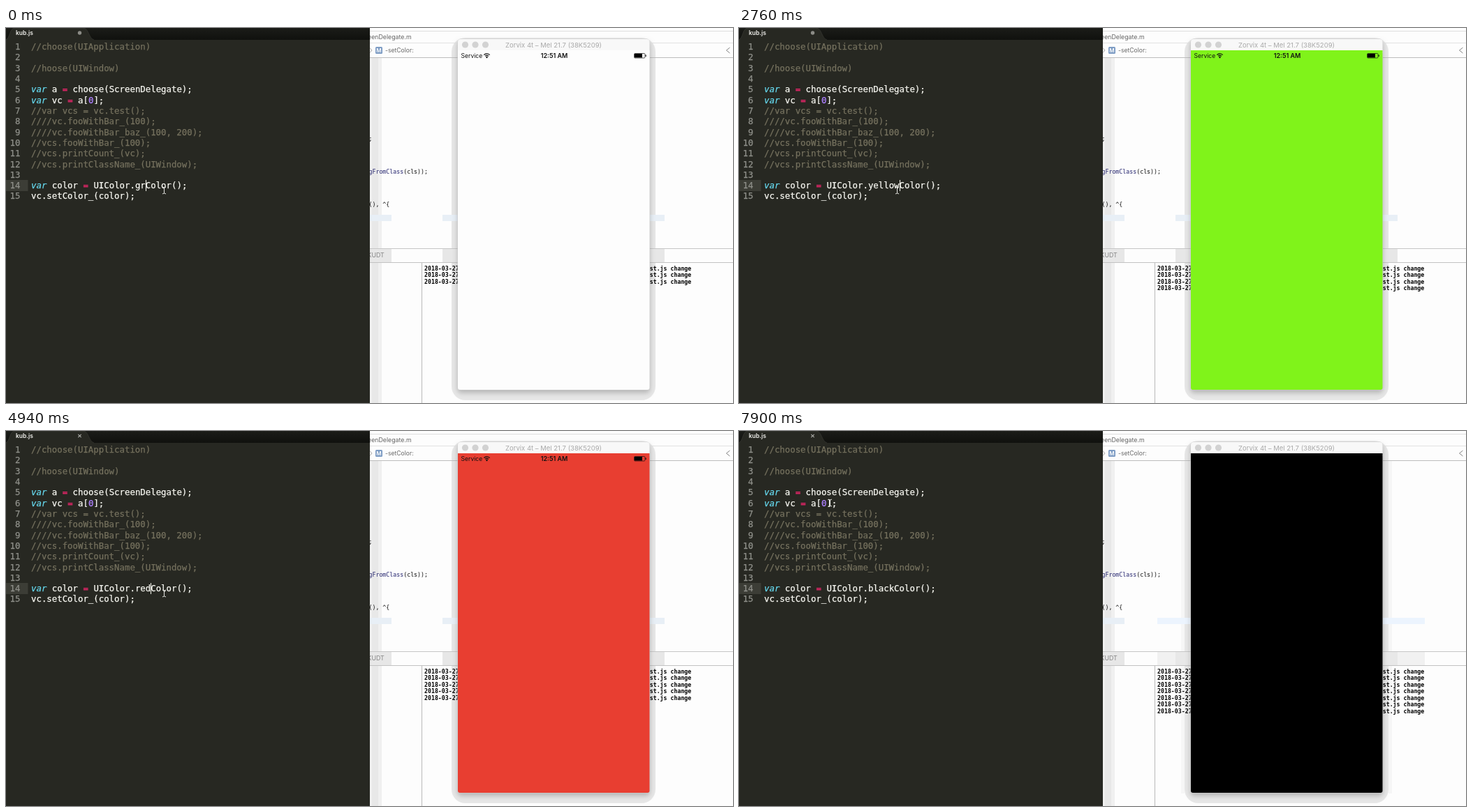
Recreate the animation shown at these times as an HTML page with a canvas. Size 1041 px wide and 538 px high, loop 8000 ms.

```html
<!DOCTYPE html>
<html lang="en">
<head>
<meta charset="utf-8">
<title>Live colour editing</title>
<style>
html, body { margin: 0; width: 100%; height: 100%; overflow: hidden; background: #fdfdfd; }
canvas { display: block; width: 1041px; height: 538px; }
</style>
</head>
<body>
<canvas id="stage" width="1041" height="538"></canvas>
<script>
const ctx = document.getElementById('stage').getContext('2d');
const LOOP = 8000;
const CODE_X = 36, CHAR = 7.45, LINE = 15.32;
const CODE_FONT = '12.37px "DejaVu Sans Mono", monospace';
const CODE_ITALIC = 'italic ' + CODE_FONT;
const SMALL_MONO = '8.25px "DejaVu Sans Mono", monospace';
const UI = 'Inter, Roboto, sans-serif';
const WORD_LINE = 14, WORD_COL = 20;

// Each run: start, end, and the words typed or erased at even steps between.
const typing = [
  [0, 0, 'gr'], [90, 90, 'gre'], [290, 380, 'gree green'],
  [1380, 1380, 'gree'], [1560, 1770, 'gre gr g'], [1920, 1920, ''],
  [2190, 2460, 'y ye yel yell'], [2640, 2760, 'yello yellow'],
  [3540, 3650, 'yello yell'], [3800, 3800, 'yel'], [3980, 4220, 'ye y '],
  [4430, 4520, 'r re'], [4700, 4700, 'red'],
  [5660, 6330, 're r  b bl bla blac black']
].flatMap(([start, end, words]) => words.split(' ').map((word, i, all) => ({
  time: start + (end - start) * i / Math.max(1, all.length - 1), value: word
})));

const steps = pairs => pairs.map(([time, value]) => ({ time, value }));
const screens = steps([[0, '#fdfdfd'], [590, '#80f31a'], [3030, '#fdf632'], [4940, '#e83e31'], [6890, '#000']]);
const dirty = steps([[0, true], [590, false], [1380, true], [3030, false], [3540, true], [4940, false], [5660, true], [6750, false]]);
const logCount = steps([[0, 3], [670, 4], [3120, 5], [5030, 6], [6800, 6], [6890, 7]]);
const caret = steps([[0, true], [1090, false], [1380, true], [3420, false], [3540, true], [5420, false],
  [5660, true], [6690, false], [7100, true], [7600, false]]);

const at = (list, t) => list.findLast(s => s.time <= t + 0.5).value;

const source = [
  '//choose(UIApplication)', '', '//hoose(UIWindow)', '',
  'var a = choose(ScreenDelegate);', 'var vc = a[0];', '//var vcs = vc.test();',
  '////vc.fooWithBar_(100);', '////vc.fooWithBar_baz_(100, 200);',
  '//vcs.fooWithBar_(100);', '//vcs.printCount_(vc);',
  '//vcs.printClassName_(UIWindow);', '', '', 'vc.setColor_(color);'
];

function rect(x, y, w, h, fill) {
  ctx.fillStyle = fill;
  ctx.fillRect(x, y, w, h);
}

function rounded(x, y, w, h, radii, fill) {
  ctx.beginPath();
  ctx.roundRect(x, y, w, h, radii);
  ctx.fillStyle = fill;
  ctx.fill();
}

function disc(x, y, r, fill) {
  ctx.beginPath();
  ctx.arc(x, y, r, 0, Math.PI * 2);
  ctx.fillStyle = fill;
  ctx.fill();
}

function text(str, x, y, font, fill, align = 'left') {
  ctx.font = font;
  ctx.fillStyle = fill;
  ctx.textAlign = align;
  ctx.fillText(str, x, y);
}

// A hairline outline gives the slightly heavier weight of smoothed screen text.
function codeText(str, x, y, font, fill, align) {
  text(str, x, y, font, fill, align);
  ctx.strokeStyle = fill;
  ctx.lineWidth = 0.25;
  ctx.strokeText(str, x, y);
}

function stroke(points, color, width) {
  ctx.beginPath();
  points.forEach(([x, y]) => ctx.lineTo(x, y));
  ctx.strokeStyle = color;
  ctx.lineWidth = width;
  ctx.stroke();
}

function drawCodeLine(line, y) {
  if (line.startsWith('//')) {
    codeText(line, CODE_X, y, CODE_FONT, '#75715e');
    return;
  }
  let col = 0;
  for (const part of line.split(/(var|=|\d)/)) {
    const color = part === 'var' ? '#66d9ef' : part === '=' ? '#f92672' : /^\d$/.test(part) ? '#ae81ff' : '#f8f8f2';
    codeText(part, CODE_X + col * CHAR, y, part === 'var' ? CODE_ITALIC : CODE_FONT, color);
    col += part.length;
  }
}

function drawTab(isDirty) {
  const bar = ctx.createLinearGradient(0, 0, 0, 17);
  bar.addColorStop(0, '#1b1c18');
  bar.addColorStop(1, '#10110e');
  rect(0, 0, 521, 17, bar);
  ctx.beginPath();
  ctx.moveTo(0, 17);
  ctx.bezierCurveTo(6, 14, 5, 0, 13, 0);
  ctx.lineTo(110, 0);
  ctx.bezierCurveTo(119, 0, 118, 15, 126, 17);
  ctx.fillStyle = '#272822';
  ctx.fill();
  ctx.strokeStyle = '#3b3c35';
  ctx.lineWidth = 0.7;
  ctx.stroke();
  text('kub.js', 14, 10, `600 8.5px ${UI}`, '#f0f0ec');
  if (isDirty) {
    disc(105.5, 7, 2.7, '#8c8c87');
  } else {
    stroke([[103.3, 4.8], [107.7, 9.2]], '#a9a9a4', 1.2);
    stroke([[107.7, 4.8], [103.3, 9.2]], '#a9a9a4', 1.2);
  }
}

function drawPointer(t) {
  const p = Math.min(11, Math.max(0, Math.floor((t - 7270) / 63 + 1.01))) / 11;
  const ease = p * p * (3 - 2 * p);
  const x = Math.round(226 - 96 * ease) + 0.5, y = Math.round(233 - 130 * ease);
  stroke([[x, y - 4], [x, y + 4]], '#e4e4e0', 1);
  for (const dir of [-1, 1]) {
    stroke([[x - 2.5, y + dir * 5], [x, y + dir * 4], [x + 2.5, y + dir * 5]], '#e4e4e0', 1);
  }
}

function drawEditor(t) {
  const word = at(typing, t);
  rect(0, 0, 521, 538, '#272822');
  drawTab(at(dirty, t));
  rect(0, 218, 31.5, 16, '#3c3d36');
  source.forEach((line, i) => {
    const number = i + 1, y = 31 + LINE * i;
    codeText(String(number), 20.5, y, CODE_FONT, '#8f908a', 'right');
    drawCodeLine(number === WORD_LINE ? `var color = UIColor.${word}Color();` : line, y);
  });
  if (at(caret, t)) rect(Math.round(CODE_X + (WORD_COL + word.length) * CHAR), 218, 1, 16, '#f8f8f0');
  drawPointer(t);
}

function drawIde(t) {
  const finished = t >= 6890;
  rect(521, 0, 520, 538, '#fdfdfd');
  rect(521, 43, 17, 495, '#f0f0f0');
  rect(524, 43, 9, 495, '#e8e8e8');

  rounded(638, 14, 292, 520, 20, '#e7e7e7');
  if (finished) {
    rect(633, 42, 5, 478, '#f6f6f6');
    rect(930, 42, 5, 478, '#f6f6f6');
  }

  const bands = finished ? [[521, 31], [599, 48], [921, 61]] : [[521, 31], [625, 22], [921, 22]];
  bands.forEach(([x, w]) => {
    const light = finished && x > 552;
    rect(x, 268, w, 9, light ? '#ecf4fe' : '#e8eff6');
    rect(x, 317, w, 19, light ? '#f1f1f1' : '#e7e7e7');
  });
  if (finished) {
    rect(625, 317, 22, 19, '#e8e8e8');
    rect(921, 317, 22, 19, '#e8e8e8');
  }

  rect(521, 4, 520, 1, '#dedede');
  rect(521, 21, 520, 1, '#e2e2e2');
  rect(521, 42, 520, 1, '#bdbdbd');
  rect(521, 316, 520, 1, '#c6c6c6');
  rect(521, 336, 520, 1, '#c2c2c2');
  rect(595, 337, 1, 201, '#b9b9b9');

  text('eenDelegate.m', 518, 16, `8.8px ${UI}`, '#666');
  stroke([[521, 28.5], [524, 32], [521, 35.5]], '#aaa', 1);
  rounded(529, 27, 10, 10, 1.5, '#7d9cc4');
  text('M', 534, 35, `600 8px ${UI}`, '#fff', 'center');
  text('-setColor:', 543, 35, `8.6px ${UI}`, '#686868');
  stroke([[1036.5, 28], [1031.5, 32], [1036.5, 36]], '#858585', 1);

  text(';', 519.5, 161.5, SMALL_MONO, '#111');
  text('gFromClass', 519.5, 209, SMALL_MONO, '#26266f');
  text('(cls));', 569.2, 209, SMALL_MONO, '#111');
  text('(), ^{', 519.5, 256, SMALL_MONO, '#111');
  text('KUDT', 517.5, 329, `8.8px ${UI}`, '#858585');

  for (let i = 0; i < at(logCount, t); i++) {
    const y = 347.7 + 9.5 * i;
    text('2018-03-27', 599, y, 'bold ' + SMALL_MONO, '#000');
    text('st.js change', 921.7, y, 'bold ' + SMALL_MONO, '#000');
  }
}

function drawStatusBar() {
  text('Service', 651.5, 43, `8.6px ${UI}`, '#111');
  ctx.strokeStyle = '#111';
  ctx.lineWidth = 1.2;
  for (const r of [3.3, 5.8]) {
    ctx.beginPath();
    ctx.arc(688.5, 42.6, r, -Math.PI * 0.76, -Math.PI * 0.24);
    ctx.stroke();
  }
  disc(688.5, 42, 1.2, '#111');
  text('12:51 AM', 785, 43, `600 9px ${UI}`, '#111', 'center');
  ctx.beginPath();
  ctx.roundRect(899.5, 36.5, 15.5, 6.5, 1.2);
  ctx.lineWidth = 0.7;
  ctx.stroke();
  rect(900, 37, 11, 5.5, '#000');
  rect(915.5, 38.5, 1.2, 2.5, '#111');
}

function drawPhone(t) {
  const screen = at(screens, t);
  ctx.save();
  ctx.shadowColor = 'rgba(0, 0, 0, 0.22)';
  ctx.shadowBlur = 7;
  ctx.shadowOffsetY = 4;
  rounded(646.5, 15.5, 275.5, 504, 5, '#cfcfcf');
  ctx.restore();
  rounded(647, 16, 274.5, 20, [4, 4, 0, 0], '#f8f8f8');
  [657.5, 672, 686.5].forEach(x => disc(x, 24, 4.6, '#d2d2d2'));
  text('Zorvix 4t – Mel 21.7 (38K5209)', 784, 27.6, `9.5px ${UI}`, '#a9a9a9', 'center');
  rounded(647, 32, 274.5, 487, [0, 0, 3, 3], screen);
  if (screen !== '#000') drawStatusBar();
}

function frame() {
  const t = performance.now() % LOOP;
  drawIde(t);
  drawPhone(t);
  drawEditor(t);
  requestAnimationFrame(frame);
}
frame();
</script>
</body>
</html>
```
